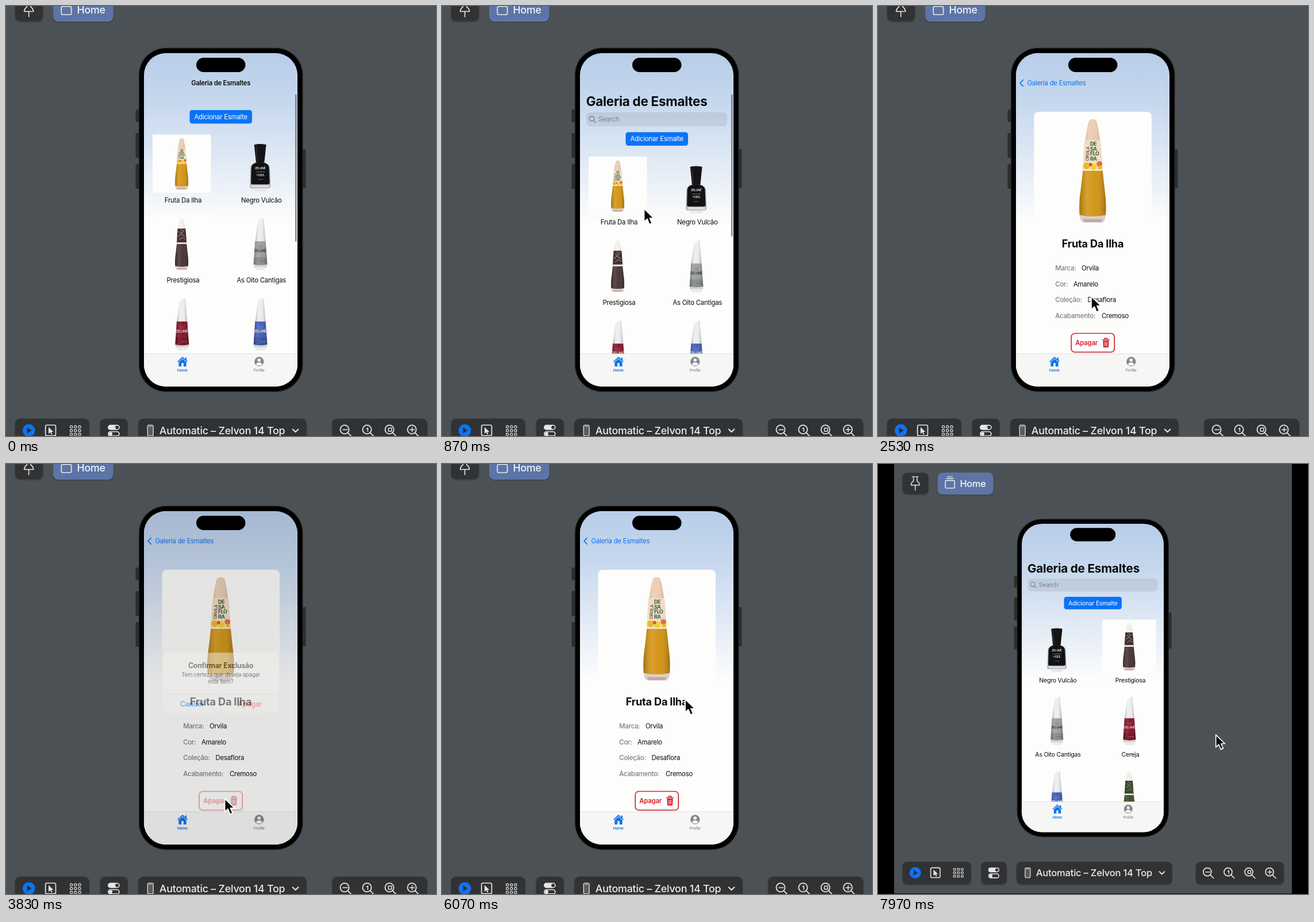
Write an HTML page that moves like this. It is 748 px wide and 748 px high and loops after 8 s.

```html
<!DOCTYPE html>
<html lang="pt">
<head>
<meta charset="utf-8">
<title>Galeria de Esmaltes</title>
<style>
html, body { margin: 0; width: 100%; height: 100%; overflow: hidden; background: #000; }
svg { display: block; width: 100vw; height: 100vh; font-family: Inter, "Open Sans", sans-serif; letter-spacing: -.015em; }
</style>
</head>
<body>
<svg id="stage" viewBox="0 0 748 748"></svg>
<script>
const LOOP = 8000, BLUE = [10, 115, 240], GREY = [140, 144, 150];
const stage = document.getElementById('stage');

// Drawing helpers
const rect = (x, y, w, h, r, fill, more = '') =>
  `<rect x="${x}" y="${y}" width="${w}" height="${h}" rx="${r}" fill="${fill}" ${more}/>`;
const path = (d, fill, more = '') => `<path d="${d}" fill="${fill}" ${more}/>`;
const line = (d, color, w, more = '') =>
  path(d, 'none', `stroke="${color}" stroke-width="${w}" stroke-linecap="round" stroke-linejoin="round" ${more}`);
const dot = (x, y, r, fill, more = '') => `<circle cx="${x}" cy="${y}" r="${r}" fill="${fill}" ${more}/>`;
const text = (x, y, size, str, fill = '#0b0b0b', weight = 400, anchor = 'start', more = '') =>
  `<text x="${x}" y="${y}" font-size="${size}" fill="${fill}" font-weight="${weight}" text-anchor="${anchor}" ${more}>${str}</text>`;
const group = (id, inner, more = '') => `<g id="${id}" ${more}>${inner}</g>`;
const shaded = (d, fill) => path(d, fill) + path(d, 'url(#gloss)');

// Bottles are drawn in a 100 x 100 box
const TALL_CAP = 'M46.2 9Q46.8 6.3 49.8 6.3T53.4 9Q56.6 22 58.2 49.5H41.4Q43 22 46.2 9Z';
const TALL_BODY = 'M41.4 50.3H58.4Q59.6 63 60.7 72Q61.5 81 60.9 88Q50 90.5 38.7 88Q38.1 81 38.9 72Q40.2 63 41.4 50.3Z';

function tall(c) {
  const label = 'M42.9 24H56.5Q57.6 35 58.2 49.5H41.4Q42 35 42.9 24Z';
  const art = c.art
    ? path(label, c.body) +
      line('M45 29l5 3 4-5M44 38l4-5 7 4M46 43l5-4 5 3M48 26l3 2', c.art, 1) +
      path('M41.5 47.6H58.1V50.2H41.4Z', '#eceae8')
    : path(label, '#efdcc2') +
      dot(44.6, 46, 2.8, '#f0b81f') + dot(50.5, 47, 2.7, '#f4cf35') + dot(55.6, 44.5, 2.4, '#e2703a') +
      dot(48, 45, 1.4, '#d9542f') + dot(56, 47.5, 1.6, '#f0b81f') +
      ['DE', 'SA', 'FLO', 'RA'].map((s, i) => text(47.6, 28.8 + i * 4.3, 4.4, s, '#2f6040', 700)).join('') +
      text(0, 0, 3.7, 'ORVILA', '#5c4436', 500, 'start', 'transform="translate(46.4 42)rotate(-86)"');
  return path('M38.7 85Q38.4 92 41 94.2H58.7Q61.3 92 60.9 85Z', '#dccfca') +
    path('M41.6 91.6H58.2L57 94.2H42.8Z', '#bfaaa6') +
    shaded(TALL_BODY, c.body) + shaded(TALL_CAP, c.cap) + art;
}

function cone(c) {
  return path('M38.6 84H62.4L61.6 90.5H39.4Z', '#d4d5d6') +
    path('M40.5 91.5H60.5L57 95H44Z', '#e9e9ea') +
    shaded('M41.4 45H59.4L62.2 85Q50 88 38.8 85Z', c.body) +
    path('M39.6 73H61.4L62.2 85Q50 88 38.8 85Z', '#000', 'opacity=".12"') +
    shaded('M41.6 45.5L46 12Q50 7 56 5.3L59.4 45.5Z', '#ececef') +
    text(50.2, 64.5, 5.6, 'ZELUNÊ', c.ink, 600, 'middle') +
    line('M46 54H55M47 57H54', c.ink, .5, 'opacity=".55"') +
    line('M50 80H54M56 80H59', c.ink, .7, 'opacity=".6"');
}

function squat() {
  return path('M39 49.5Q42 47 50 47T61 49.5Q66 52 66.6 57L68 89Q67.6 92 65 92H35Q32.4 92 32.6 89L33.6 57Q34 52 39 49.5Z', '#9fa1a3') +
    path('M34 86.5H66.6L66 91H35Z', '#dcdddf') +
    path('M38 93.5H63L59 97H42Z', '#e6e6e8') +
    path('M39.5 50Q43 47.5 50 47.5T60.5 50Q64.8 52 65.2 57L66.2 82Q66 85.5 63 85.5H37.4Q34.2 85.5 34.4 82L35 57Q35.4 52 39.5 50Z', '#121214') +
    path('M39.8 17.5Q50 15 60.4 17.5L57.2 48H43Z', '#151517') +
    line('M43 20.5L45 44', '#3c3d41', 1.1) +
    text(50.2, 59.5, 5, 'ZELUNÊ', '#f2f2f2', 600, 'middle') +
    line('M43 64H58', '#9a9a9c', .7) +
    text(50.2, 71, 6, '+GEL', '#f2f2f2', 600, 'middle', 'font-family="Noto Serif, serif"') +
    line('M46 77H55', '#8a8a8c', .6);
}

const WHITE = '#f1f0ee';
const sunny = tall({ cap: '#e9cbb0', body: '#d2920f' });
const items = [
  { name: 'Fruta Da Ilha', art: sunny, box: 1 },
  { name: 'Negro Vulcão', art: squat() },
  { name: 'Prestigiosa', art: tall({ cap: WHITE, body: '#432f31', art: '#a39a96' }), box: 1 },
  { name: 'As Oito Cantigas', art: cone({ body: '#989c9b', ink: '#2d2f30' }) },
  { name: 'Cereja', art: cone({ body: '#7d0f24', ink: '#f0d9dc' }) },
  { name: '', art: cone({ body: '#3c57b4', ink: '#eef0fa' }) },
  { name: '', art: tall({ cap: WHITE, body: '#39472a', art: '#7d9c8a' }), box: 1 }
];

const grid = list => list.slice(0, 6).map((it, i) => {
  const x = 255 + (i % 2) * 136.3, y = 262 + (i >> 1) * 139.5;
  return `<g transform="translate(${x} ${y})">` +
    (it.box ? rect(0, 0, 101.5, 101.5, 0, '#fdfdfc') : '') +
    `<g transform="scale(1.015)">${it.art}</g>` +
    text(53, 118, 11.4, it.name, '#0b0b0b', 400, 'middle') + '</g>';
}).join('');

const lens = (x, y, r, color, w) =>
  dot(x, y, r, 'none', `stroke="${color}" stroke-width="${w}"`) +
  line(`M${x + r * .74} ${y + r * .74}L${x + r * 1.55} ${y + r * 1.55}`, color, w);

const page = () => rect(240, 82, 267, 580, 0, 'url(#sky)');

function gallery() {
  const search = rect(251, 185, 245, 24.5, 7, '#767680', 'fill-opacity=".16"') +
    lens(260.5, 196, 4.2, '#72767e', 1.2) + text(272, 201.3, 11.4, 'Search', '#7c8088');
  return page() +
    group('body', rect(319.5, 219.5, 108.5, 23.5, 4.5, '#0b73f5') +
      text(373.7, 235.3, 11.4, 'Adicionar Esmalte', '#fff', 400, 'middle') +
      group('allItems', grid(items)) + group('restItems', grid(items.slice(1)))) +
    group('large', text(250.7, 173.5, 22.4, 'Galeria de Esmaltes', '#0b0b0b', 700) + search) +
    group('inline', text(373.7, 138, 11.3, 'Galeria de Esmaltes', '#0b0b0b', 600, 'middle')) +
    rect(503, 154, 2.6, 256, 1.3, '#6f7680', 'id="bar"');
}

function detail() {
  const rows = [['Marca:', 'Orvila', 354], ['Cor:', 'Amarelo', 340],
    ['Coleção:', 'Desaflora', 364.5], ['Acabamento:', 'Cremoso', 389]];
  const RED = '#d4212e';
  const trash = line('M390.5 580.5H402.5M394 580V578H399V580', RED, 1.4) +
    path('M391.3 582H401.7L400.9 594H392.1Z', RED) +
    line('M394.4 584.5V591.5M396.5 584.5V591.5M398.6 584.5V591.5', '#fff', .8);
  return page() +
    line('M252.5 128.5L247 134L252.5 139.5', '', 1.7, 'class="tint"') +
    text(259.5, 138, 11.4, 'Galeria de Esmaltes', '', 400, 'start', 'class="tint"') +
    rect(271.5, 184, 204.5, 204.5, 8, '#fdfdfc') +
    `<g transform="translate(271.8 184)scale(2.04)">${sunny}</g>` +
    text(373.5, 420, 18.2, 'Fruta Da Ilha', '#0b0b0b', 700, 'middle') +
    rows.map(([k, v, x], i) => text(308.3, 460 + i * 27.5, 11.4, k, '#7c7e84', 500) +
      text(x, 460 + i * 27.5, 11.4, v)).join('') +
    group('erase', rect(335, 569.5, 78, 35, 7, '#000', 'opacity=".07"') +
      rect(336.2, 569.5, 75, 32.5, 6, '#fefefe', `stroke="${RED}" stroke-width="1.6"`) +
      text(343.3, 590, 11.4, 'Apagar', RED, 600) + trash);
}

function tabs() {
  const BAR = '#f6f6f5';
  const house = path('M298 618.2L307 610L311.8 614.3V611.5H314V616.3L316 618.2L315 619.5L307 612.4L299 619.5Z', '', 'class="tint"') +
    path('M300.4 619.4L307 613.6L313.6 619.4V627H308.8V621H305.2V627H300.4Z', '', 'class="tint"');
  const person = dot(440.3, 618.5, 8.2, '#85878c') + dot(440.3, 616, 2.8, BAR) +
    path('M434.6 623.4Q436.4 620 440.3 620T446 623.4Q443.4 625.6 440.3 625.6T434.6 623.4Z', BAR);
  return rect(240, 605, 267, 58, 0, BAR) + rect(240, 604.6, 267, .7, 0, '#d3d5d6') + house + person +
    text(306.7, 636.3, 6.7, 'Home', '', 600, 'middle', 'class="tint"') +
    text(440.3, 636.3, 6.7, 'Profile', '#85878c', 500, 'middle');
}

function alertBox() {
  return rect(282, 333, 183.5, 96, 9.5, 'url(#card)') +
    text(373.6, 357.5, 11.3, 'Confirmar Exclusão', '#0b0b0b', 600, 'middle') +
    text(373.6, 371.3, 8.8, 'Tem certeza que deseja apagar', '#1c1c1c', 400, 'middle') +
    text(373.6, 382.2, 8.8, 'este item?', '#1c1c1c', 400, 'middle') +
    path('M282 398.3H465.5V399H282ZM373.2 399H373.9V429H373.2Z', '#cfd0cd') +
    text(327.6, 418, 11.4, 'Cancel', '#0b76ee', 600, 'middle') +
    text(419.6, 418, 11.4, 'Apagar', '#e23a3a', 400, 'middle');
}

function phone() {
  const side = (x, y, h) => rect(x, y, 6, h, 1.5, '#2b2e30');
  return side(225.5, 180, 22) + side(225.5, 221, 43) + side(225.5, 275, 43) + side(515.5, 249, 68) +
    rect(231, 72.8, 285.5, 598.4, 47, '#1b1d1e') + rect(232.5, 74.3, 282.5, 595.4, 45.5, '#000') +
    `<g clip-path="url(#screen)">` +
    group('gallery', gallery()) + rect(240, 82, 267, 580, 0, '#000', 'id="shade"') +
    group('detail', detail()) + tabs() +
    rect(240, 82, 267, 580, 0, '#000', 'id="dim"') + group('alert', alertBox()) + '</g>' +
    rect(331, 90, 85.5, 25, 12.5, '#000');
}

function toolbar() {
  const INK = '#e4e5e6';
  const panel = (x, y, w, h, fill = '#303234') =>
    rect(x - 1, y, w + 2, h + 2, 10, '#000', 'opacity=".14"') +
    rect(x, y, w, h, 9, fill, 'stroke="#fff" stroke-opacity=".05"');
  const box = (x, y, w, h, r) => rect(x, y, w, h, r, 'none', `stroke="${INK}" stroke-width="1.7"`);
  let cells = '';
  for (let i = 0; i < 9; i++)
    cells += rect(111.6 + (i % 3) * 7.2, 730.2 + (i / 3 | 0) * 6.5, 4, 3.8, 1, 'none', `stroke="${INK}" stroke-width="1.2"`);
  const marks = ['M586 737H594', 'M627.5 735.3L629.4 734V740.3', 'M665.3 734.3H670.7V739.7H665.3Z', 'M702.5 737H710.5M706.5 733V741'];
  return panel(15.5, -14, 49, 41) +
    line('M34 -6.4H45.4M36.4 -6.4V1.5Q32 4.5 31.7 9.5H47.7Q47.4 4.5 43 1.5V-6.4M39.7 9.5V18.8', INK, 1.6) +
    panel(82, -14, 104.5, 41, '#5d75a6') +
    box(96.3, .6, 17.4, 14.4, 2.6) + line('M98.5 -3H111.5M100.5 -6.4H109.5', INK, 1.5) +
    text(123.6, 13, 17.7, 'Home', '#f4f5f7', 500) +
    panel(15.5, 717.5, 129.5, 43) + panel(163.5, 717.5, 48.5, 43) + panel(230, 717.5, 293, 43) + panel(567, 717.5, 166, 43) +
    dot(39.7, 738.3, 10.8, '#0f73f2') + path('M36.6 733L44.8 738.3L36.6 743.6Z', '#26303f') +
    box(68.7, 729, 17.8, 18.6, 2.5) + path('M74 732.5V744L77 741.6L78.9 745.6L80.6 744.8L78.8 741H82.5Z', INK) +
    cells +
    rect(177, 728.6, 20.8, 8.8, 4.4, INK) + dot(193.2, 733, 3, '#303234') +
    box(177.9, 740.5, 19, 7.4, 3.7) + dot(182, 744.2, 3, INK) +
    rect(246.3, 729.2, 9.8, 18.6, 2.4, '#5a5c5e', `stroke="${INK}" stroke-width="1.3"`) + line('M249.8 731.4H252.6', INK, 1) +
    text(266.8, 744.7, 17.9, 'Automatic – Zelvon 14 Top', '#ececec', 500) +
    line('M498.8 736.3L503.6 741L508.4 736.3', INK, 2.1) +
    marks.map((d, i) => lens(589 + i * 39, 736.8, 7.6, INK, 1.8) + line(d, INK, 1.5)).join('');
}

stage.innerHTML = `<defs>
  <linearGradient id="sky" gradientUnits="userSpaceOnUse" x1="0" y1="82" x2="0" y2="378">
    <stop stop-color="#b8cde9"/><stop offset=".3" stop-color="#c7d8ee"/><stop offset="1" stop-color="#fdfdfc"/></linearGradient>
  <linearGradient id="gloss"><stop stop-color="#000" stop-opacity=".22"/><stop offset=".3" stop-color="#fff" stop-opacity=".13"/>
    <stop offset=".6" stop-color="#fff" stop-opacity=".04"/><stop offset="1" stop-color="#000" stop-opacity=".24"/></linearGradient>
  <linearGradient id="card" x1="0" y1="0" x2="0" y2="1"><stop stop-color="#f1f0ea"/><stop offset=".4" stop-color="#f2f2f0"/><stop offset="1" stop-color="#ececea"/></linearGradient>
  <clipPath id="screen"><rect x="240" y="82" width="267" height="580" rx="38"/></clipPath></defs>` +
  rect(0, 0, 748, 748, 0, '#000') +
  group('scene', rect(0, -40, 748, 817.4, 0, '#4b5154') + phone() + toolbar() +
    group('cursor', path('M0 0V23.2L5.4 18.2L9.3 27.3L13.8 25.4L10 16.6H17Z', '#0a0a0a',
      'stroke="#fff" stroke-width="1.8" stroke-linejoin="round"')));

// Motion
const el = {};
stage.querySelectorAll('[id]').forEach(n => el[n.id] = n);
const tinted = stage.querySelectorAll('.tint');
const ramp = (t, a, b) => Math.min(1, Math.max(0, (t - a) / (b - a)));
const out = p => 1 - (1 - p) ** 3;
const smooth = p => p * p * (3 - 2 * p);
const move = (n, x, y = 0) => n.setAttribute('transform', `translate(${x} ${y})`);
const fade = (n, v) => n.setAttribute('opacity', v);

// Pointer moves: start, end, x, y
const moves = [[0, 0, 351.5, 352.5], [1900, 2450, 371, 505], [2700, 3400, 380.5, 582],
  [4150, 4850, 421.5, 409], [5200, 5400, 423, 409], [6300, 7200, 605, 479]];

function pointer(t) {
  let [, , x, y] = moves[0];
  for (const [a, b, nx, ny] of moves.slice(1)) {
    const p = smooth(ramp(t, a, b));
    x += (nx - x) * p;
    y += (ny - y) * p;
  }
  return [x, y];
}

function draw(t) {
  const zoom = 1 - .075 * smooth(ramp(t, 6090, 6680));
  el.scene.setAttribute('transform', `translate(374 374)scale(${zoom})translate(-374 -374)`);

  const fold = 1 - smooth(ramp(t, 250, 600));
  move(el.body, 0, -38.5 * fold);
  fade(el.inline, fold);
  fade(el.large, (1 - fold) ** 2);
  el.bar.setAttribute('height', 247 + 9 * fold);
  fade(el.bar, .85 * (1 - ramp(t, 1050, 1350)));

  const shown = out(ramp(t, 1400, 1900)) - out(ramp(t, 6150, 6650));
  move(el.gallery, -80 * shown);
  move(el.detail, 268 * (1 - shown));
  fade(el.shade, .1 * shown);
  fade(el.allItems, t < 5800 ? 1 : 0);
  fade(el.restItems, t < 5800 ? 0 : 1);

  fade(el.erase, 1 - .7 * (ramp(t, 3620, 3680) - ramp(t, 3790, 4020)));
  const enter = out(ramp(t, 3750, 4150)), leave = smooth(ramp(t, 5480, 5730));
  fade(el.dim, .2 * (enter - leave));
  fade(el.alert, enter - leave);
  el.alert.setAttribute('transform', `translate(373.7 381)scale(${1.2 - .2 * enter})translate(-373.7 -381)`);

  const k = ramp(t, 3830, 4130) - ramp(t, 5480, 5730);
  const color = `rgb(${BLUE.map((c, i) => Math.round(c + (GREY[i] - c) * k))})`;
  tinted.forEach(n => n.setAttribute(n.getAttribute('fill') === 'none' ? 'stroke' : 'fill', color));

  move(el.cursor, ...pointer(t));
  fade(el.cursor, ramp(t, 300, 450));
}

const start = performance.now();
function tick() {
  draw((performance.now() - start) % LOOP);
  requestAnimationFrame(tick);
}
tick();
</script>
</body>
</html>
```
